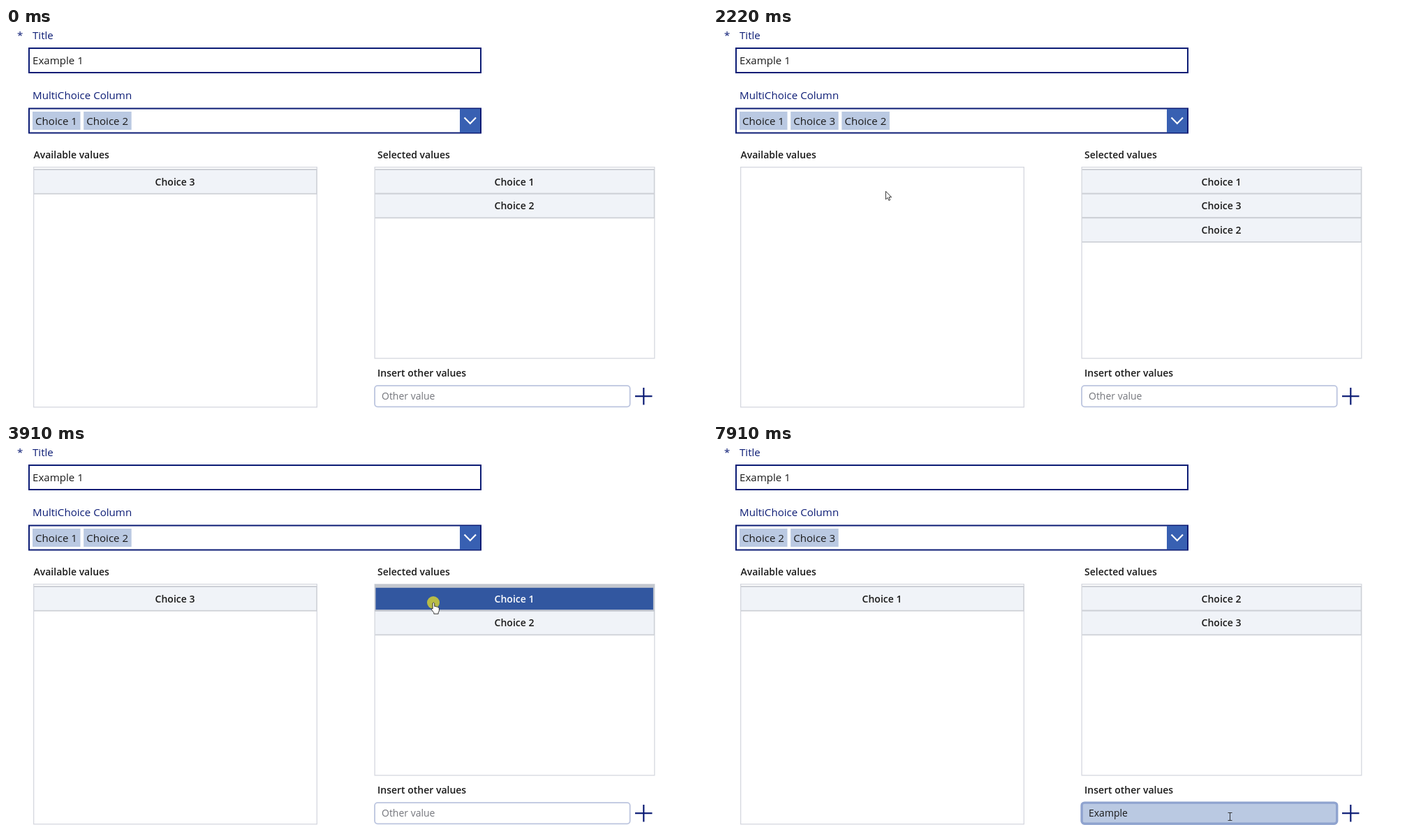
Animation of 1004x558 px, one loop 7990 ms. Source, as an HTML page with a canvas:

```html
<!DOCTYPE html>
<html lang="en">
<head>
<meta charset="utf-8">
<title>Choice picker</title>
<style>
  html, body { margin: 0; width: 100%; height: 100%; overflow: hidden; background: #fff; }
  canvas { display: block; }
</style>
</head>
<body>
<canvas id="stage" width="1004" height="558"></canvas>
<script>
const ctx = document.getElementById('stage').getContext('2d');
const LOOP = 7990, BEGIN = 210, STEP = 77;
const NAVY = '#0c1c75', CHIP = '#bac9e2', BLUE = '#3257a0', INK = '#1a1a1a';
const FONT = '"Open Sans", "Noto Sans", sans-serif';

const LEFT = { x: 39, w: 407, h: 345, key: 'left' };
const RIGHT = { x: 527.5, w: 402, h: 275, key: 'right' };
const PITCH = 34.6;
const rowTop = i => 202 + PITCH * i;

// Pointer: it rests before each click, and passes through the other stops.
const REST = 230, PRESS = 2 * STEP;
const stop = (at, x, y) => ({ at, x, y });
const clicks = [
  stop(749, 640, 257), stop(1825, 254, 224), stop(2210, 247, 234),
  stop(2828, 617, 239), stop(3983, 612, 226), stop(4368, 341, 226)
];
const path = [
  stop(BEGIN, 655, 512), stop(3140, 622, 446), stop(3444, 618, 312),
  stop(4445, 341, 247), stop(5090, 678, 528), stop(7750, 678, 528),
  stop(7910, 740, 533),
  ...clicks, ...clicks.map(c => ({ ...c, at: c.at - REST }))
].sort((a, b) => a.at - b.at);

const HOVER_INPUT = 5000, FOCUS = 5260, BLINK = 560;
const WORD = 'Example', TYPE_FROM = 6260, KEY_GAP = 158, TYPE_END = 7830;

function hoveredRow(list, count, p) {
  if (!p || p.x < list.x || p.x > list.x + list.w) return -1;
  const i = Math.floor((p.y - 203) / PITCH);
  return i >= 0 && i < count ? i : -1;
}

// Each click sends the row under it to the end of the other list.
function listsAt(t) {
  const lists = { left: [3], right: [1, 2] };
  for (const c of clicks.filter(c => c.at <= t)) {
    const [from, to] = c.x < RIGHT.x ? [LEFT, RIGHT] : [RIGHT, LEFT];
    const items = lists[from.key];
    lists[to.key].push(...items.splice(hoveredRow(from, items.length, c), 1));
  }
  return lists;
}

function pointerAt(t) {
  if (t < BEGIN) return null;
  const next = path.find(s => s.at > t);
  const last = path.findLast(s => s.at <= t);
  if (!next) return last;
  const p = (t - last.at) / (next.at - last.at);
  const e = p * p * (3 - 2 * p);
  return { x: last.x + (next.x - last.x) * e, y: last.y + (next.y - last.y) * e };
}

function box(x, y, w, h, color) {
  ctx.fillStyle = color;
  ctx.fillRect(x, y, w, h);
}

function frame(x, y, w, h, line, color) {
  ctx.strokeStyle = color;
  ctx.lineWidth = line;
  ctx.strokeRect(x + line / 2, y + line / 2, w - line, h - line);
}

function text(str, x, y, size, color, weight = 400, align = 'left') {
  ctx.font = `${weight} ${size}px ${FONT}`;
  ctx.textAlign = align;
  ctx.fillStyle = color;
  ctx.fillText(str, x, Math.round(y));
}

function stroke(points, width, color) {
  ctx.beginPath();
  points.forEach(([x, y]) => ctx.lineTo(x, y));
  ctx.lineWidth = width;
  ctx.strokeStyle = color;
  ctx.stroke();
}

function drawList({ x, w, h }, items, hover) {
  frame(x, 199, w, h + 0.5, 1.3, '#d5d8df');
  items.forEach((n, i) => {
    const y = rowTop(i);
    box(x + 1, y, w - 1.5, PITCH + 2, '#cdd0d6');
    box(x + 1.3, y + 2, w - 3, PITCH - 1.7, '#f0f3f8');
  });
  if (hover >= 0) {
    const y = rowTop(hover);
    box(x + 0.5, y - 2, w - 1, PITCH + 4, '#c3c7ce');
    box(x + 2, y + 2.8, w - 4.6, PITCH - 3.2, BLUE);
  }
  items.forEach((n, i) => text('Choice ' + n, x + w / 2 - 0.5, rowTop(i) + 23.6, 14,
    i === hover ? '#fff' : INK, 600, 'center'));
}

function drawForm(chosen) {
  text('*', 16, 16, 15, NAVY);
  text('Title', 38, 16, 15.1, NAVY);
  frame(32, 28, 649, 37, 2, NAVY);
  text('Example 1', 38, 52, 15.1, INK);

  text('MultiChoice Column', 38, 102, 15.1, NAVY);
  frame(32, 114.5, 649, 37, 2, NAVY);
  box(650, 116, 29, 34, '#3860b2');
  stroke([[656.5, 128.5], [664.8, 137], [673, 128.5]], 2.2, '#fff');
  chosen.forEach((n, i) => {
    const x = 38 + 73.2 * i;
    box(x, 120, 68.5, 26, CHIP);
    text('Choice ' + n, x + 4, 139, 15.1, INK);
  });

  text('Available values', 39.5, 187, 14, INK, 600);
  text('Selected values', 532, 187, 14, INK, 600);
  text('Insert other values', 532, 500, 14, INK, 600);
  stroke([[901, 528.2], [925.5, 528.2]], 2.2, NAVY);
  stroke([[913.3, 516], [913.3, 540.5]], 2.2, NAVY);
}

function drawInput(t, hover) {
  const focus = t >= FOCUS;
  const line = focus ? 3.4 : 1.8;
  const out = focus ? 0.8 : 0;
  const inset = line / 2 - out;
  ctx.beginPath();
  ctx.roundRect(527.2 + inset, 512.2 + inset, 367.4 - 2 * inset, 32 - 2 * inset, 4);
  ctx.fillStyle = hover ? CHIP : '#fff';
  ctx.fill();
  ctx.lineWidth = line;
  ctx.strokeStyle = hover ? '#8fa3cf' : '#bcc5df';
  ctx.stroke();
  if (!focus) {
    text('Other value', 538, 533, 14, '#75777d');
    return;
  }
  const count = Math.max(0, Math.floor((t - TYPE_FROM) / KEY_GAP) + 1);
  const typed = WORD.slice(0, count);
  text(typed, 538, 533, 14, INK);
  // The caret blinks until typing keeps it lit.
  const lit = count ? t < TYPE_END : Math.floor((t - FOCUS + 180) / BLINK) !== 1;
  if (lit) box(538 + ctx.measureText(typed).width, 519, 1.2, 20, INK);
}

function drawShape(shape, x, y) {
  ctx.save();
  ctx.translate(x, y);
  ctx.fillStyle = '#fff';
  ctx.fill(shape);
  ctx.lineWidth = 0.9;
  ctx.strokeStyle = '#222';
  ctx.stroke(shape);
  ctx.restore();
}

const arrow = new Path2D('M0 0V11.6L2.7 9.2L4.5 13.2L6.3 12.4L4.6 8.5H8.2Z');
const hand = new Path2D('M-1.3 .8Q0 -1.2 1.3 .8V5.3Q2.8 4.5 3.7 5.9Q5.2 5.2 6 6.6Q7.8 6.3 8 8V11' +
  'Q7.9 13 6.8 14V16H.4V14.4L-3 10Q-3.8 8.3 -2.3 8.2L-1.3 9Z');

function drawBeam({ x, y }) {
  const c = '#333';
  stroke([[x + 0.5, y - 5.5], [x + 0.5, y + 5.5]], 1, c);
  for (const d of [-5.5, 5.5]) stroke([[x - 2.5, y + d], [x + 3.5, y + d]], 1, c);
}

function drawPointer(p, t, overRow, overInput) {
  if (clicks.some(c => t >= c.at - PRESS && t < c.at)) {
    ctx.beginPath();
    ctx.arc(p.x, p.y, 9, 0, 7);
    ctx.fillStyle = 'rgba(230, 222, 40, .75)';
    ctx.fill();
  }
  if (overInput) drawBeam(p);
  else drawShape(overRow ? hand : arrow, p.x + 0.4, p.y + 0.2);
}

function draw(t) {
  const q = t < BEGIN ? 0 : t - (t - BEGIN) % STEP;
  const lists = listsAt(q);
  const p = pointerAt(q);
  const overInput = q >= HOVER_INPUT;
  let overRow = false;

  box(0, 0, 1004, 558, '#fff');
  drawForm(lists.right);
  for (const list of [LEFT, RIGHT]) {
    const items = lists[list.key];
    const hover = hoveredRow(list, items.length, p);
    drawList(list, items, hover);
    overRow ||= hover >= 0;
  }
  drawInput(t, overInput);
  if (p) drawPointer(p, q, overRow, overInput);
}

const start = performance.now();
function tick() {
  draw((performance.now() - start) % LOOP);
  requestAnimationFrame(tick);
}
tick();
</script>
</body>
</html>
```
